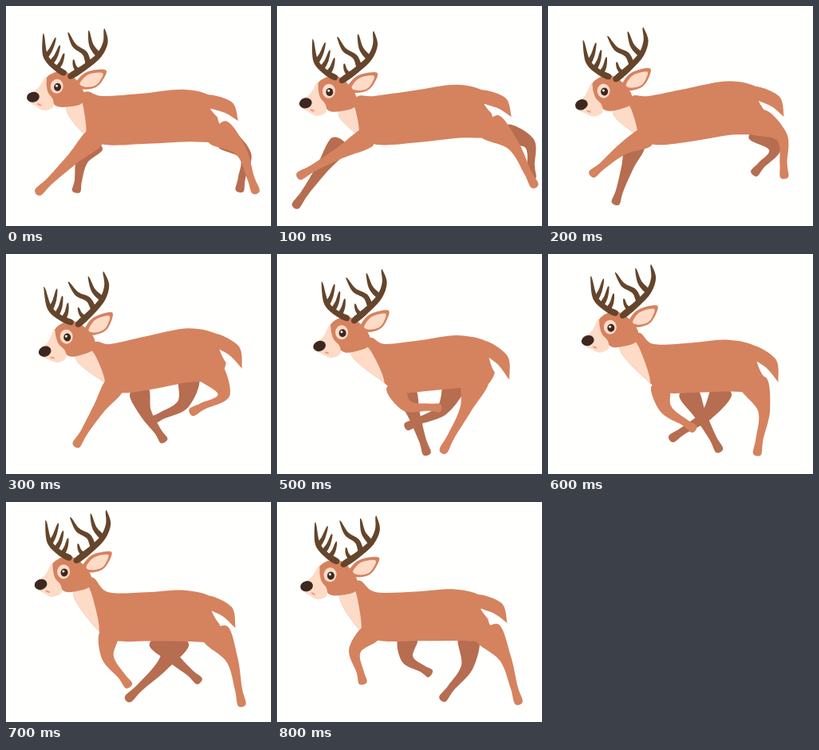
An HTML page with a canvas that plays this animation: 332x276 px, repeating every 900 ms.

```html
<!DOCTYPE html>
<html lang="en">
<head>
<meta charset="utf-8">
<title>Running deer</title>
<style>
  html, body { margin: 0; width: 100%; height: 100%; overflow: hidden; background: #fffffd; }
  canvas { display: block; width: 100vw; height: 100vh; }
</style>
</head>
<body>
<canvas id="stage" width="332" height="276"></canvas>
<script>
const ctx = document.getElementById('stage').getContext('2d');
const STEP = 100, STEPS = 9;
const PAPER = '#fffffd', COAT = '#d5825f', SHADE = '#b66d50', CREAM = '#fddbc7',
      HORN = '#65452b', NOSE = '#3d281f', PINK = '#f09a86';

const lerp = (a, b, t) => a.map((v, i) => v + (b[i] - v) * t);
const add = ([x, y], dx, dy) => [x + dx, y + dy];
const cosDeg = deg => Math.cos(deg * Math.PI / 180);

// Periodic motion: a mean plus harmonics, each [amplitude, phase in degrees].
const wave = (mean, ...harmonics) => turn =>
  harmonics.reduce((sum, [amp, phase], i) => sum + amp * cosDeg((i + 1) * turn - phase), mean);

const gait = {
  surge: wave(0, [8.9, 188]),
  bob: wave(99.7, [8.9, 89], [2.8, 47]),
  tilt: wave(1.3, [4.2, -22], [1.6, 14]),
  rump: wave(0, [8.8, -71]),
  sway: wave(0, [6, 145]),
  tail: wave(0, [8, 190])
};
const hooves = {
  nearFore: [wave(113, [86, 220], [2, 0], [10.8, 210]), wave(221, [7, -3], [12.7, 250], [12, 30])],
  farFore: [wave(161, [86, 224], [53, 251], [7, 30]), wave(238, [9, 131], [13.7, 87])],
  nearHind: [wave(269, [61.5, -4], [21.6, 143]), wave(233, [25, -81], [5.7, 73], [6, 210])],
  farHind: [wave(209, [80, 33], [33, 60]), wave(225, [19.5, -61], [5.5, 242])]
};

// Closed Catmull-Rom curve through the given points.
function blob(pts) {
  const path = new Path2D(), n = pts.length;
  const at = i => pts[(i + n) % n];
  path.moveTo(...pts[0]);
  for (let i = 0; i < n; i++) {
    const [a, b, c, d] = [at(i - 1), at(i), at(i + 1), at(i + 2)];
    path.bezierCurveTo(b[0] + (c[0] - a[0]) / 6, b[1] + (c[1] - a[1]) / 6,
                       c[0] - (d[0] - b[0]) / 6, c[1] - (d[1] - b[1]) / 6, ...c);
  }
  path.closePath();
  return path;
}

// Tapered shape around a centre line; each joint has a half width.
function limb(joints, halfWidths) {
  const left = [], right = [];
  joints.forEach(([x, y], i) => {
    const a = joints[Math.max(i - 1, 0)], b = joints[Math.min(i + 1, joints.length - 1)];
    const w = halfWidths[i] / Math.hypot(b[0] - a[0], b[1] - a[1]);
    const nx = (b[1] - a[1]) * w, ny = (a[0] - b[0]) * w;
    left.push([x + nx, y + ny]);
    right.unshift([x - nx, y - ny]);
  });
  return blob([...left, ...right]);
}

function fill(path, color) {
  ctx.fillStyle = color;
  ctx.fill(path);
}

function oval(x, y, rx, ry, color, turn = 0) {
  const path = new Path2D();
  path.ellipse(x, y, rx, ry, turn, 0, Math.PI * 2);
  fill(path, color);
}

// The shorter the distance from root to hoof, the further the knee is pushed out.
function drawLeg(root, hoof, reach, bend, width, color) {
  const dx = hoof[0] - root[0], dy = hoof[1] - root[1], dist = Math.hypot(dx, dy);
  const push = bend * Math.max(0, reach - dist) / dist;
  const knee = add(lerp(root, hoof, .4), dy * push, -dx * push);
  fill(limb([root, knee, lerp(knee, hoof, .65), hoof], [width, 7.5, 4.6, 5]), color);
}

function drawTail(base, swing) {
  const tip = add(base, 28 - swing / 2, 36 + swing), mid = lerp(base, tip, .55);
  fill(limb([add(base, 0, 15), add(mid, -3, 9), add(tip, 1, 9)], [1.5, 5, .5]), PAPER);
  fill(limb([add(base, -8, 3), add(mid, 3, -3), tip], [7, 8, .6]), COAT);
}

function drawBody(eye, surge, rump, sway, thighShift, swing) {
  const nape = add(eye, 34, 6), throat = add(eye, 11, 27);
  const chest = [116 + 2 * surge, 161], tailBase = [263 + sway, 112 + rump];
  const outline = blob([
    nape, [128 + surge * .8, 113], [176 + surge * .6, 108 + rump * .6], [226 + sway * .6, 102 + rump],
    tailBase, [271 + sway, 141 + rump * 1.2], [270 + thighShift, 166 + rump], [228, 168 + rump * .8],
    [182 + surge * .6, 172 + rump * .3], [138 + 1.6 * surge, 174], chest, throat
  ]);
  fill(outline, COAT);

  const top = lerp(nape, throat, .35);
  ctx.save();
  ctx.clip(outline);
  fill(blob([add(throat, -10, -4), top, add(lerp(top, chest, .5), 4, -2),
             add(chest, 0, 3), add(lerp(throat, chest, .5), -12, 8)]), CREAM);
  ctx.restore();
  drawTail(tailBase, swing);
}

const horn = (joints, widths) => fill(limb(joints, widths), HORN);

function drawAntlers() {
  horn([[7, -18], [-7, -25], [-20, -38], [-25, -62]], [3.4, 3.4, 3, 1]);
  for (let i = 0; i < 3; i++) {
    const root = [-19 + 8 * i, -36 + 6 * i], tip = [-10 + 6.5 * i, -60 + 9 * i];
    horn([root, add(lerp(root, tip, .5), 1, 1), tip], [2.6, 2.3, 1]);
  }
  horn([[14, -15], [32, -30], [47, -46], [53, -63], [50, -78]], [3.6, 3.8, 3.4, 3, 1]);
  horn([[46, -46], [36, -57], [31, -73]], [3, 2.7, 1]);
  horn([[35, -33], [29, -46], [15, -54], [6, -68]], [3, 3.2, 2.7, 1]);
  horn([[23, -23], [18, -29], [16, -36]], [2.4, 2, 1]);
}

function drawHead(eye, tilt) {
  ctx.save();
  ctx.translate(...eye);
  ctx.rotate(tilt * Math.PI / 180);
  fill(blob([[-18, -4], [-12, -14], [0, -20], [12, -19], [24, -10], [34, 4],
             [32, 17], [16, 23], [2, 24], [-8, 16], [-16, 8]]), COAT);
  fill(blob([[-16, -11], [-24, 4], [-34, 13], [-33, 22], [-24, 27], [-14, 31],
             [-3, 26], [-4, 16], [-11, 8], [-14, -1]]), CREAM);
  oval(-29, 16, 8, 6.5, NOSE, -.35);
  oval(-20, 24.5, 3, 1.2, PINK, .3);
  drawAntlers();
  const ear = [[21, -5], [29, -19], [41, -26], [58, -28], [55, -15], [47, -5], [32, -1]];
  fill(blob(ear), COAT);
  fill(blob(ear.map(p => lerp(p, [44, -13], .27))), CREAM);
  oval(-1, -1, 8, 9, CREAM);
  oval(0, 0, 4.5, 5, NOSE);
  oval(-1.2, -1.5, 1.5, 1.5, '#fff');
  ctx.restore();
}

function draw(turn) {
  const at = track => track(turn);
  const [surge, bob, tilt, rump, sway, swing] = Object.values(gait).map(at);
  const [nearFore, farFore, nearHind, farHind] = Object.values(hooves).map(xy => xy.map(at));
  const eye = [73.4 + surge, bob];
  const thighShift = (nearHind[0] - 269) * .15;

  ctx.fillStyle = PAPER;
  ctx.fillRect(0, 0, 332, 276);
  drawLeg([241 + (farHind[0] - 209) * .4, 164 + rump], farHind, 110, .45, 13, SHADE);
  drawLeg([148 + (farFore[0] - 161) * .5, 172], farFore, 80, -.5, 12, SHADE);
  drawBody(eye, surge, rump, sway, thighShift, swing);
  drawLeg([258 + thighShift, 154 + rump * 1.2], nearHind, 110, .6, 17, COAT);
  drawLeg([130 + 2 * surge, 164], nearFore, 92, -.6, 12, COAT);
  drawHead(eye, tilt);
}

function tick() {
  draw(Math.floor(performance.now() / STEP) % STEPS * 360 / STEPS);
  requestAnimationFrame(tick);
}
tick();
</script>
</body>
</html>
```
